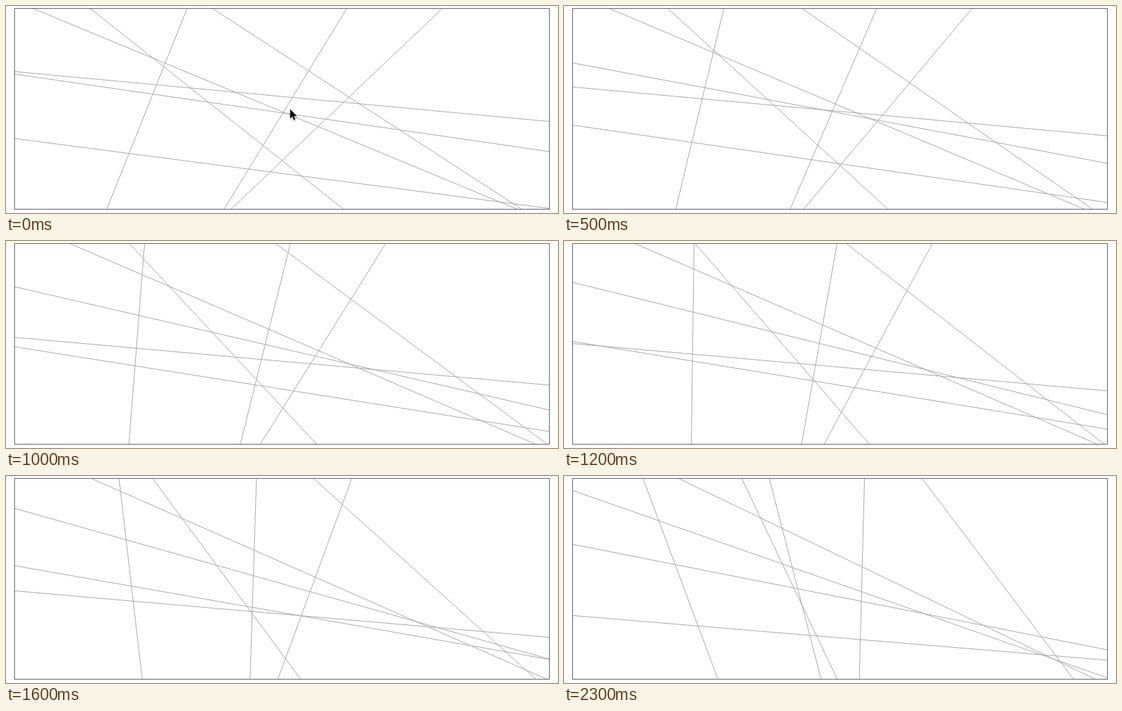
Animation, 800 px wide and 300 px high, one loop 2400 ms. Source, as an HTML page:

```html
<!DOCTYPE html>
<html lang="en">
<head>
<meta charset="utf-8">
<title>Drifting lines</title>
<style>
  html, body { margin: 0; width: 100%; height: 100%; overflow: hidden; background: #fff; }
  svg { display: block; width: 800px; height: 300px; }
  #lines { stroke: #a9a9a9; stroke-width: 1; }
  #frame { fill: none; stroke: #666; stroke-width: 1; }
  #pointer { fill: #000; stroke: #fff; stroke-width: 1.4; paint-order: stroke;
    filter: drop-shadow(0 1px 1px rgba(0, 0, 0, .3)); }
</style>
</head>
<body>
<svg viewBox="0 0 800 300">
  <g id="lines"></g>
  <rect id="frame" x="12.5" y="3.5" width="775" height="291"/>
  <path id="pointer" d="M411.8 149.4v13.7l3.2-2.9 2.3 5.3 2.1-.9-2.3-5.2h4.5z"/>
</svg>
<script>
const LEFT = 12.5, RIGHT = 787.5, TOP = 3.5, BOTTOM = 294.5;
const STEP = 100, FRAMES = 24;

const group = document.getElementById('lines');
const pointer = document.getElementById('pointer');
const lines = [];

// A point that slides along a wall at constant speed and turns back at corners.
const slider = (from, to, min, max) => t => {
  const v = from + (to - from) * t;
  return v > max ? 2 * max - v : v < min ? 2 * min - v : v;
};

function addLine(ends) {
  const el = document.createElementNS('http://www.w3.org/2000/svg', 'line');
  group.append(el);
  lines.push(t => {
    const [x1, y1, x2, y2] = ends(t);
    Object.entries({ x1, y1, x2, y2 }).forEach(([k, v]) => el.setAttribute(k, v));
  });
}

// Hangs between ceiling and floor; both ends drift sideways.
function falling(topFrom, topTo, lowFrom, lowTo) {
  const top = slider(topFrom, topTo, LEFT, RIGHT);
  const low = slider(lowFrom, lowTo, LEFT, RIGHT);
  addLine(t => [top(t), TOP, low(t), BOTTOM]);
}

// Spans the side walls; both ends drift up or down.
function crossing(leftFrom, leftTo, rightFrom, rightTo) {
  const left = slider(leftFrom, leftTo, TOP, BOTTOM);
  const right = slider(rightFrom, rightTo, TOP, BOTTOM);
  addLine(t => [LEFT, left(t), RIGHT, right(t)]);
}

falling(39, 166, 741, 805);
falling(122, 257.6, 489, 396);
falling(262.5, 114.5, 146, 223);
falling(494, 297.5, 316, 372.6);
falling(299, 519, 747.5, 836.5);
falling(632.5, 435.5, 326, 428);
crossing(95, 202.2, 167.4, 267);
crossing(98.7, 21, 211, 292.6);
crossing(192, 99, 293.4, 252);

function draw(now) {
  const n = Math.floor(now / STEP) % FRAMES;
  // The drift skips one step near the end of the loop.
  const t = (n < 22 ? n : n + 1) / FRAMES;
  lines.forEach(place => place(t));
  pointer.style.display = n ? 'none' : '';
}

const start = performance.now();
function tick() {
  draw(performance.now() - start);
  requestAnimationFrame(tick);
}
tick();
</script>
</body>
</html>
```
